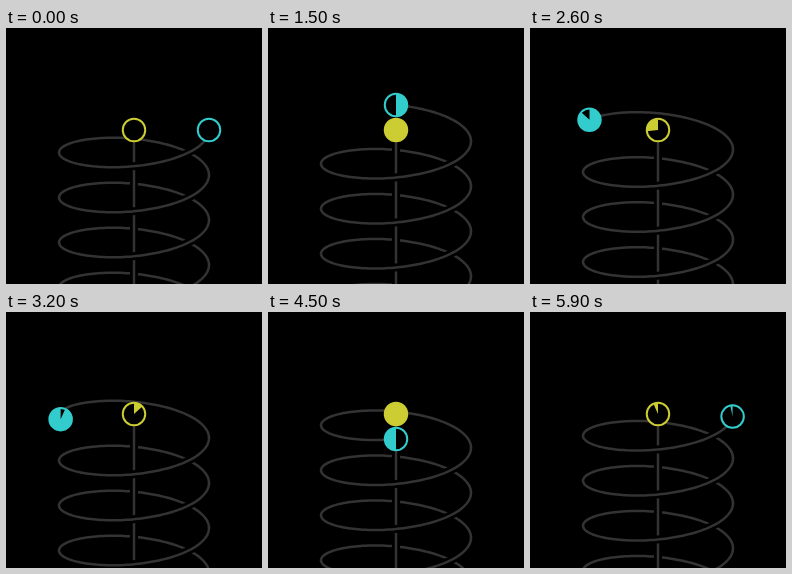
Animation, 256 px wide and 256 px high, one loop 6000 ms. Source, as an HTML page with a canvas:

```html
<!DOCTYPE html>
<html lang="en">
<head>
<meta charset="utf-8">
<title>Two clocks</title>
<style>
  html, body { margin: 0; width: 100%; height: 100%; overflow: hidden; background: #000; }
  canvas { display: block; width: 256px; height: 256px; }
</style>
</head>
<body>
<canvas id="stage" width="256" height="256"></canvas>
<script>
const ctx = document.getElementById('stage').getContext('2d');
const TAU = 2 * Math.PI;
const LOOP = 6000, STEP = 100;
const CX = 128, CY = 102, RX = 75, RY = 25, PITCH = 45;
const GRAY = '#333', YELLOW = '#cc3', CYAN = '#3cc';
const LINE = 2.5, HALO = 8, RING = 11.25;

function strokePath(trace, color, width) {
  ctx.beginPath();
  trace();
  ctx.strokeStyle = color;
  ctx.lineWidth = width;
  ctx.stroke();
}

// The helix between two orbit angles; older points have sunk further down.
function traceHelix(from, to, now) {
  const n = Math.ceil((to - from) / 0.04);
  for (let i = 0; i <= n; i++) {
    const a = from + (to - from) * i / n;
    ctx.lineTo(CX + RX * Math.cos(a), CY - RY * Math.sin(a) + PITCH * (now - a) / TAU);
  }
}

function drawHalfTurns(offset, now, halo) {
  for (let turn = -5; turn <= 0; turn++) {
    const from = turn * TAU + offset;
    const to = Math.min(from + Math.PI, now);
    if (to <= from) continue;
    if (halo) strokePath(() => traceHelix(from, to, now), '#000', HALO);
    const end = Math.min(to + 0.03, now);
    strokePath(() => traceHelix(from - 0.03, end, now), GRAY, LINE);
  }
}

function drawAxis() {
  const trace = () => { ctx.moveTo(CX, CY); ctx.lineTo(CX, 260); };
  strokePath(trace, '#000', HALO);
  strokePath(trace, GRAY, LINE);
}

// The pie fills clockwise on even turns and empties clockwise on odd ones.
function drawClock(x, y, color, turns) {
  const hand = (turns % 1) * TAU;
  const odd = Math.floor(turns) % 2 === 1;
  const top = -TAU / 4;
  ctx.beginPath();
  ctx.arc(x, y, RING, 0, TAU);
  ctx.fillStyle = '#000';
  ctx.fill();
  ctx.beginPath();
  ctx.moveTo(x, y);
  ctx.arc(x, y, RING, top + (odd ? hand : 0), top + (odd ? TAU : hand));
  ctx.fillStyle = color;
  ctx.fill();
  strokePath(() => ctx.arc(x, y, RING, 0, TAU), color, 2);
}

function draw(time) {
  const t = Math.floor((time % LOOP) / STEP) * STEP;
  const now = t / LOOP * TAU;
  ctx.fillStyle = '#000';
  ctx.fillRect(0, 0, 256, 256);
  drawHalfTurns(0, now, false);
  drawAxis();
  drawHalfTurns(Math.PI, now, true);
  drawClock(CX, CY, YELLOW, t / 1500);
  drawClock(CX + RX * Math.cos(now), CY - RY * Math.sin(now), CYAN, t / 3000);
}

let start;
function tick(time) {
  start ??= time;
  draw(time - start);
  requestAnimationFrame(tick);
}
draw(0);
requestAnimationFrame(tick);
</script>
</body>
</html>
```
